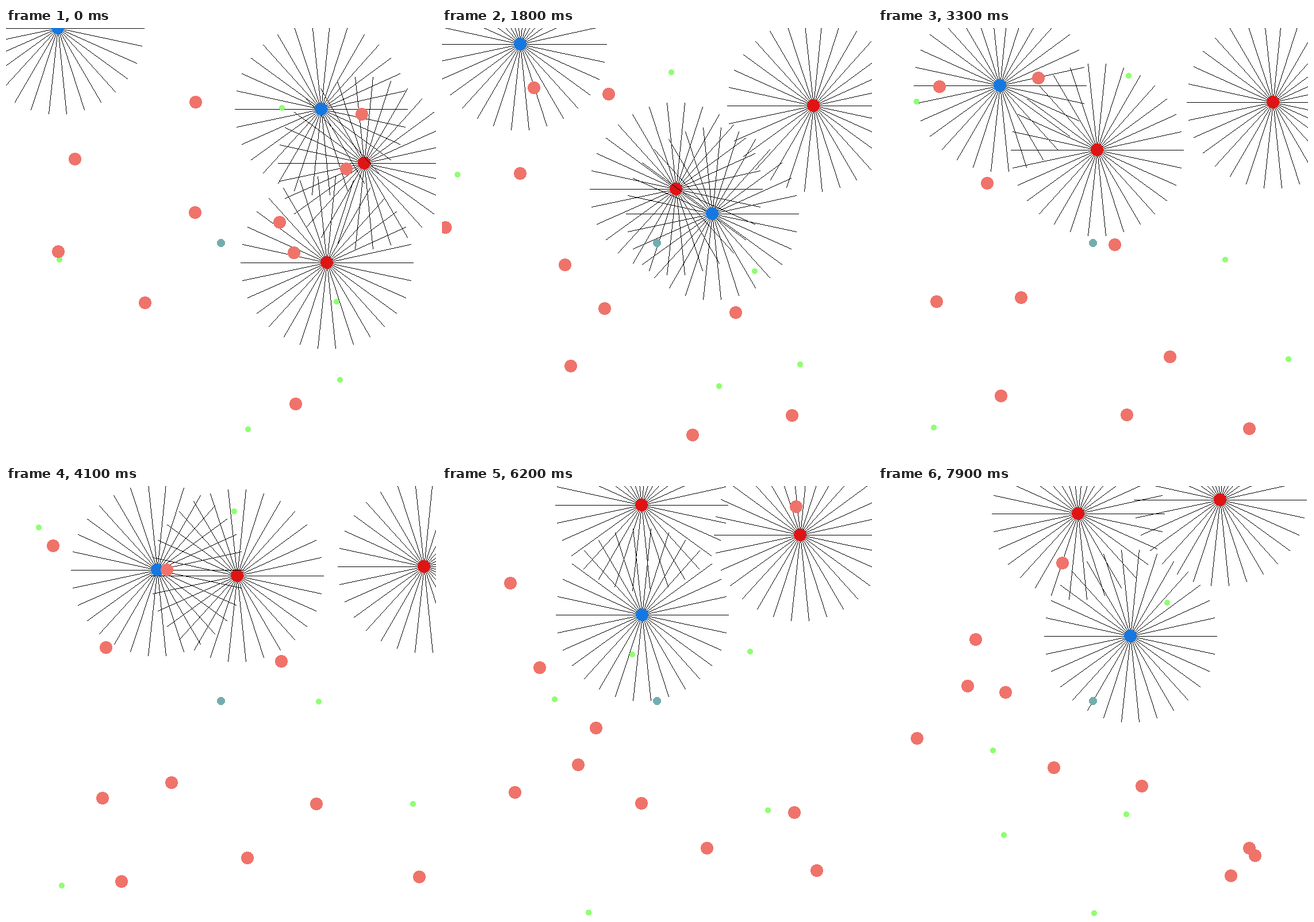
A matplotlib script for the animation above (8 s loop, 748 by 748 pixels).

```python
import numpy as np
import matplotlib.pyplot as plt
from matplotlib.animation import FuncAnimation
from matplotlib.colors import to_rgb

SIZE, DPI = 748, 100
FRAMES, INTERVAL = 80, 100
BEATS = np.array([0, 10, 25, 41, 52, 62, 79])
RAY_LENGTH, RAY_COUNT = 150, 30
WANDER = 22

# colour, radius, has rays
HUNTER = ("#df1414", 11, True)
SCOUT = ("#1578e1", 11, True)
FOOD = ("#8eff70", 5, False)
PREY = ("#ef736a", 11, False)
HOME = ("#74adad", 7, False)

rng = np.random.default_rng(7)


def ray_pixels():
    """Offsets of all one-pixel-wide rays around a centre."""
    rays = []
    for angle in np.arange(RAY_COUNT) * 2 * np.pi / RAY_COUNT:
        end = np.floor(RAY_LENGTH * np.array([np.cos(angle), np.sin(angle)]))
        steps = int(np.abs(end).max())
        rays.append(np.rint(np.linspace((0, 0), end, steps + 1)))
    return np.concatenate(rays).astype(int)


def disc_pixels(radius):
    grid = np.mgrid[-radius:radius, -radius:radius].reshape(2, -1).T
    return grid[np.hypot(*(grid + 0.5).T) < radius]


RAYS = ray_pixels()
DISCS = {r: disc_pixels(r) for r in (5, 7, 11)}


class Mover:
    """A dot travelling through points spread evenly over its beats."""

    def __init__(self, kind, *points, first=0, last=6, born=0, dies=FRAMES):
        color, self.radius, self.has_rays = kind
        self.color = np.array(to_rgb(color)) * 255
        self.points = np.array(points, float)
        self.index = np.arange(len(points))
        spread = np.linspace(first, last, len(points))
        self.times = BEATS[np.rint(spread).astype(int)]
        self.born, self.dies = born, dies
        # side steps that vanish at every point
        self.sway = rng.normal(0, 0 if self.has_rays else WANDER, (2, 2))

    def position(self, t):
        s = np.interp(t, self.times, self.index)
        x, y = (np.interp(s, self.index, axis) for axis in self.points.T)
        sway = np.sin(np.pi * s * np.array([1, 2])) @ self.sway
        spot = np.rint(np.array([x, y]) + sway)
        return np.clip(spot, 0, SIZE - 1).astype(int)

    def paint(self, canvas, t):
        if not self.born <= t < self.dies:
            return
        spot = self.position(t)
        if self.has_rays:
            fill(canvas, spot + RAYS, 0)
        fill(canvas, spot + DISCS[self.radius], self.color)


def fill(canvas, pixels, color):
    x, y = pixels[((pixels >= 0) & (pixels < SIZE)).all(axis=1)].T
    canvas[y, x] = color


# in painting order
movers = [
    Mover(HUNTER, (623, 235), (645, 155), (647, 118), (727, 140),
          (718, 123), (623, 85), (595, 24)),
    Mover(HUNTER, (558, 408), (460, 295), (360, 267), (402, 156),
          (379, 80), (347, 33), (348, 48)),
    Mover(SCOUT, (90, 0), (109, 0), (160, 53), (263, 146),
          (324, 161), (348, 224), (439, 261)),
    Mover(SCOUT, (548, 141), (474, 255), (466, 383), last=2, dies=33),

    Mover(FOOD, (480, 139), (397, 44), (200, 460)),
    Mover(FOOD, (93, 403), (57, 72), (219, 607)),
    Mover(FOOD, (575, 476), (544, 375), (503, 203)),
    Mover(FOOD, (581, 612), (708, 553), (432, 571)),
    Mover(FOOD, (421, 698), (560, 589), last=2, dies=33),
    Mover(FOOD, (97, 695), (376, 743), first=3, born=33),

    Mover(PREY, (120, 228), (174, 281), (156, 348)),
    Mover(PREY, (91, 389), (288, 516), (459, 522)),
    Mover(PREY, (501, 391), (540, 553), (656, 643)),
    Mover(PREY, (242, 478), (201, 688), (68, 439)),
    Mover(PREY, (504, 654), (719, 680), (614, 678)),

    # caught, then replaced elsewhere
    Mover(PREY, (330, 129), (273, 85), (295, 147), last=4, dies=56),
    Mover(PREY, (268, 421), (222, 359), first=5, born=56),
    Mover(PREY, (329, 321), (315, 512), (616, 36), last=5, dies=68),
    Mover(PREY, (321, 134), first=6, born=68),
    Mover(PREY, (619, 150), dies=5),
    Mover(PREY, (180, 112), (67, 104), (170, 267), first=1, born=5),
    Mover(PREY, (592, 245), dies=3),
    Mover(PREY, (429, 698), (390, 634), (646, 630), first=1, born=3),
    Mover(PREY, (476, 338), dies=6),
    Mover(PREY, (23, 347), (198, 545), (306, 490), first=1, born=6),

    Mover(HOME, (374, 374)),
]

fig = plt.figure(figsize=(SIZE / DPI, SIZE / DPI), dpi=DPI, facecolor="white")
ax = fig.add_axes([0, 0, 1, 1])
ax.axis("off")
blank = np.full((SIZE, SIZE, 3), 255, np.uint8)
stage = ax.imshow(blank, interpolation="nearest", aspect="auto")


def draw(frame):
    canvas = blank.copy()
    for mover in movers:
        mover.paint(canvas, frame)
    stage.set_data(canvas)
    return [stage]


anim = FuncAnimation(fig, draw, frames=FRAMES, interval=INTERVAL,
                     repeat=True, repeat_delay=0, blit=False)
plt.show()
```
